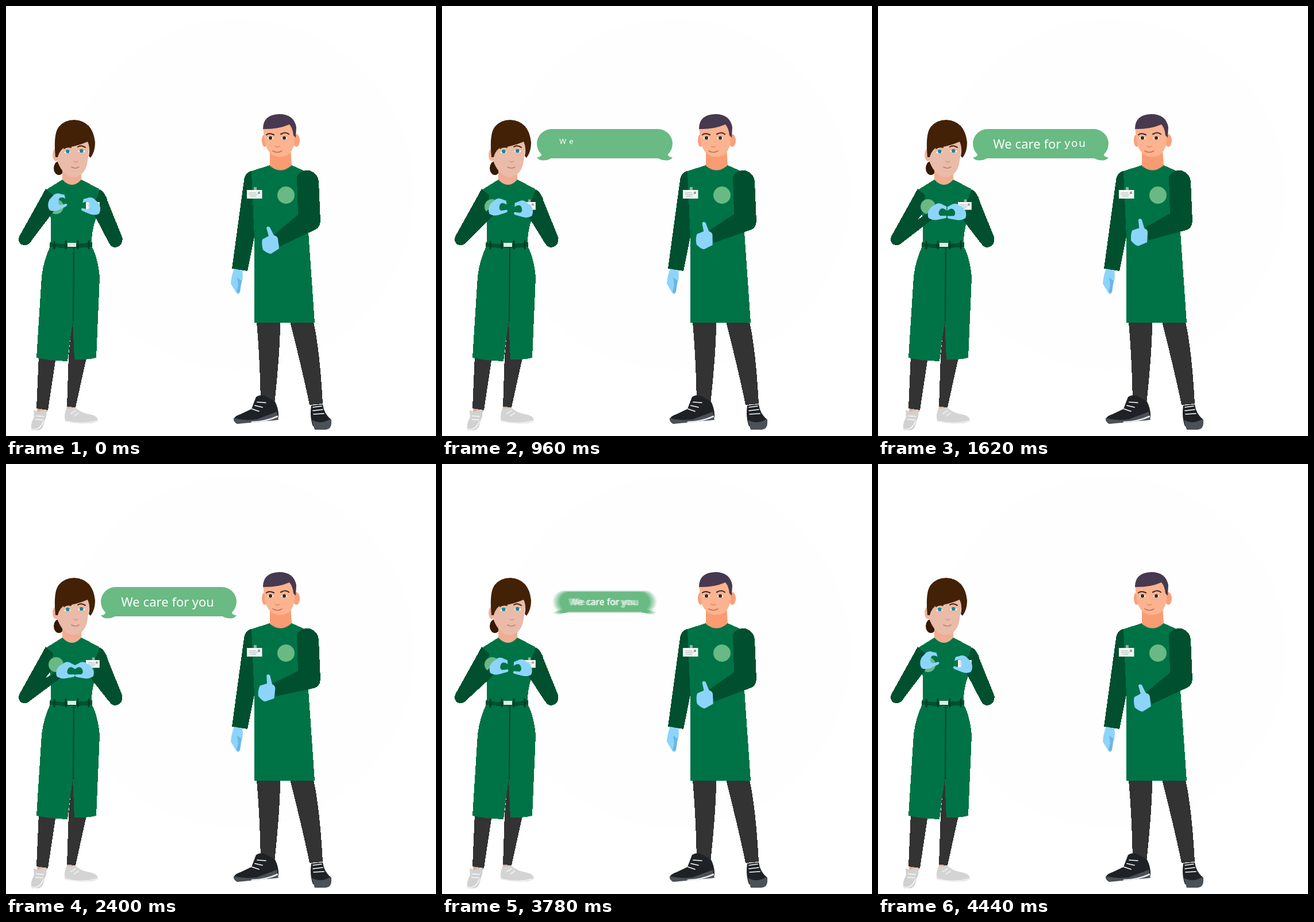
Recreate the animation shown at these times as an HTML page. Size 748 by 748 pixels, loop 4500 ms.

```html
<!DOCTYPE html>
<html lang="en">
<head>
<meta charset="utf-8">
<title>We care for you</title>
<style>
  html, body { margin: 0; width: 100%; height: 100%; overflow: hidden; background: #fff; }
  svg { display: block; width: 100%; height: 100%; }
  .coat, .sleeve, .pants { shape-rendering: crispEdges; }
  .coat { fill: #007346; }
  .sleeve { fill: #00502f; }
  .glove { fill: #8dd4fb; }
  .gloveDark { fill: #6cb5e8; }
  .pants { fill: #333; }
  .mark { fill: #6ab985; }
  .line { fill: none; stroke-linecap: round; stroke-linejoin: round; }
  text { font: 22px "Noto Sans", "Open Sans", sans-serif; fill: #fff; text-anchor: middle; }
</style>
</head>
<body>
<svg viewBox="0 0 748 748">
  <defs>
    <path id="tail" d="M165 263Q173 264 174 255L191 264Q184 269 174 268.5Q168 268 165 263Z"/>
    <g id="bubble" fill="#69ba83">
      <rect x="165" y="214" width="236" height="51" rx="25.5"/>
      <use href="#tail"/>
      <use href="#tail" transform="translate(566 0) scale(-1 1)"/>
    </g>
    <g id="words"></g>
    <path id="hand" class="glove" d="M88 369Q85 359 93 351L103 345Q109 343 114 347L120 350V357Q112 350 108 356Q104 363 109 366L119 366Q122 370 115 371L103 373Q94 374 88 369Z"/>
    <g id="badge">
      <path fill="#8fb3a2" d="M12 -5h5v6h-5z"/>
      <path fill="#f4f6f5" d="M0 0h26.500v15H0z"/>
      <path class="line" stroke="#a9b5af" d="M4 5h12M4 8h14M6 11h10"/>
      <path fill="#95a59d" d="M19 3h4v4h-4z"/>
    </g>
  </defs>

  <circle cx="404" cy="327" r="306" fill="#fefefe"/>

  <g id="woman">
    <path fill="#e6ad94" d="M54 696h18v10H54zM106 694h15v8h-15z"/>
    <path fill="#d1d1d1" d="M48 703L56 706L69 701Q73 711 67 721Q65 737 56 738L45 738Q41 729 49 715Z"/>
    <path fill="#d4d4d4" d="M105 700L121 699Q130 708 149 711Q162 715 159 723Q140 730 103 723Q100 712 105 700Z"/>
    <path class="line" stroke="#f1f1f1" stroke-width="2" d="M103 722Q130 729 158 722M46 736Q58 739 65 723M121 704l-8 5M126 708l-7 5M53 713l12 1M52 719l12 1"/>
    <path class="pants" d="M57 608L87 610L73 703L53 700ZM116 540L140 612L121 698L106 697L109 608Z"/>
    <path class="coat" d="M98 302Q115 319 131 302L162 318L166 350L157 368Q148 393 149 418Q160 438 163 472L157 612Q139 616 119 615L116 547L107 618Q78 617 53 612L62 470Q66 440 77 418Q79 394 78 370L66 322Z"/>
    <path class="line" stroke="#00502f" stroke-width="2.5" d="M118 422L117 548"/>
    <path class="sleeve" d="M76 412Q113 417 150 411V419Q113 423 76 419Z"/>
    <path class="line" stroke="#003d24" stroke-width="3" d="M84 410v12M104 409v13M125 409v13M144 409v13"/>
    <path fill="#e0ebe5" d="M107 412h15v7h-15z"/>

    <ellipse cx="92" cy="282" rx="9" ry="12" fill="#341904"/>
    <ellipse cx="87" cy="259" rx="6" ry="11" fill="#efb49c"/>
    <path fill="#f0ad91" d="M98 282H131V302Q115 320 98 302Z"/>
    <path fill="#e9bba8" d="M90 250V272Q100 296 117 298Q136 296 141 275L147 236Q115 224 90 250Z"/>
    <path fill="#432106" d="M86 263Q82 222 92 210Q102 198 119 198Q151 200 155 237Q155 254 147 264L144 261Q147 246 142 236Q121 245 100 247Q92 253 90 263Z"/>
    <path class="line" stroke="#432106" stroke-width="2" d="M101 248Q106 244 113 246M125 245Q131 241 138 246"/>
    <path fill="#fff" d="M101 255Q107 248 113 254Q107 258 101 255ZM125 253Q131 247 138 253Q131 257 125 253Z"/>
    <g fill="#188899">
      <circle cx="107.300" cy="253" r="3.300"/>
      <circle cx="131.300" cy="252" r="3.300"/>
    </g>
    <path class="line" stroke="#cf947f" stroke-width="1.300" d="M118 270Q121 273 125 270"/>
    <path class="line" stroke="#bd7c78" stroke-width="1.600" d="M114 280Q121 284 127 280"/>

    <path class="sleeve" d="M69 318L82 329L79 358L42 412Q35 418 27 415Q20 410 23 401ZM163 319Q173 324 177 340L202 402Q204 419 189 420Q182 419 178 410L155 366L153 345Z"/>
    <circle class="mark" cx="87" cy="349" r="13"/>
    <use href="#badge" transform="translate(139 341) scale(.9)"/>
    <g id="leftArm">
      <path class="sleeve" d="M24 400L89 360L94 373L39 414Q30 417 25 411Z"/>
      <use href="#hand"/>
    </g>
    <g id="rightArm">
      <path class="sleeve" d="M151 359L202 402Q203 416 191 419Q184 419 179 413L146 371Z"/>
      <use href="#hand" transform="translate(240 0) scale(-1 1)"/>
    </g>
  </g>

  <g id="man">
    <path class="pants" d="M436 549H477Q477 600 467 692L443 690Q442 620 436 549ZM494 549H535Q546 600 551 692L528 694Q517 640 494 549Z"/>
    <path fill="#1e2226" d="M435 680Q444 674 454 680L468 688Q475 702 474 716L440 724L396 719Q398 713 408 710L427 701ZM531 695L551 693Q553 709 566 720L565 731H534Q528 716 531 695Z"/>
    <path fill="#4a5157" d="M396 717Q415 722 436 719L471 706L474 720L402 727Q395 723 396 717ZM532 720Q548 729 565 718Q569 736 556 737H537Z"/>
    <path class="line" stroke="#e8eaec" stroke-width="3" d="M428 724Q452 723 472 714"/>
    <path class="line" stroke="#fff" stroke-width="1.700" d="M437 689l15 1M433 695l13 3M428 701l12 4M534 698l15-2M534 704l17-2M535 710l18-1"/>
    <path class="coat" d="M427 287L459 277Q478 292 497 277L524 289L530 380L526 393L537 551H432V400L424 340Z"/>
    <path class="sleeve" d="M427 287Q416 289 414 303L393 457L420 461L432 402Z"/>
    <path class="glove" d="M397 457L411 460Q414 475 408 484L407 497Q404 504 400 498L391 483Q392 469 397 457Z"/>
    <path class="gloveDark" d="M402 472L410 478L407 497Q404 503 401 497L404 486Z"/>

    <ellipse cx="450" cy="234" rx="5" ry="11" fill="#f6a17c"/>
    <ellipse cx="505" cy="234" rx="6" ry="11" fill="#f6a17c"/>
    <path fill="#f99b73" d="M459 248H495L497 277Q478 294 459 278Z"/>
    <path fill="#fcb38f" d="M447 211L501 203L502 234Q501 250 491 259Q477 266 463 259Q452 250 450 235Z"/>
    <path fill="#47394f" d="M447 214Q447 189 475 188Q501 188 505 211L504 229L500 225Q499 213 493 206Q472 215 447 214Z"/>
    <path class="line" stroke="#3b2c36" stroke-width="2.200" d="M453 224Q458 220 466 224M478 223Q486 218 492 223"/>
    <path fill="#fff" d="M454 230Q460 224 466 230Q460 234 454 230ZM478 230Q484 224 490 230Q484 234 478 230Z"/>
    <g fill="#302a2c">
      <circle cx="460" cy="229.500" r="3"/>
      <circle cx="484" cy="229.500" r="3"/>
    </g>
    <path class="line" stroke="#dc8964" stroke-width="1.400" d="M468 244Q472 247 476 244"/>
    <path class="line" stroke="#bf705c" stroke-width="1.600" d="M464 252Q472 257 480 252"/>

    <circle class="mark" cx="487" cy="329" r="15"/>
    <use href="#badge" transform="translate(419 320)"/>
    <path class="sleeve" d="M506 298Q511 285 527 286Q542 290 544 305L547 375Q546 386 535 390L516 384L508 362Z"/>
    <g id="thumbArm">
      <path class="sleeve" d="M467 397L513 359L540 362Q553 381 538 389L477 418Z"/>
      <path class="glove" d="M453 386Q455 382 459 385L466 399Q472 400 473 405L475 422L461 431Q455 431 447 424Q444 413 446 406L457 400Z"/>
    </g>
  </g>

  <g id="speech"></g>
</svg>
<script>
  const LOOP = 4500, SAMPLES = 8, SHUTTER = 15;
  const NS = "http://www.w3.org/2000/svg";
  const byId = id => document.getElementById(id);
  const set = (el, attrs) => {
    for (const key in attrs) el.setAttribute(key, attrs[key]);
  };
  const add = (parent, tag, attrs) => {
    const el = document.createElementNS(NS, tag);
    set(el, attrs);
    return parent.appendChild(el);
  };
  const ramp = (t, start, end) => Math.min(1, Math.max(0, (t - start) / (end - start)));
  const easeInOut = u => (1 - Math.cos(Math.PI * u)) / 2;
  const easeOutBack = u => 1 + 2.7 * (u - 1) ** 3 + 1.7 * (u - 1) ** 2;

  const words = [["We", 216.4], ["care", 260.6], ["for", 303.4], ["you", 342.8]].map(([label, center], i) => {
    const el = add(byId("words"), "text", {});
    el.textContent = label;
    return { el, center, start: 810 + 180 * i };
  });
  const copies = href => Array.from({ length: SAMPLES }, () => add(byId("speech"), "use", { href }));
  const bubbles = copies("#bubble"), captions = copies("#words");

  const bubbleScale = t => easeOutBack(t < 2000 ? ramp(t, 515, 815) : 1 - ramp(t, 3549, 3849));

  function drawWords(t) {
    for (const { el, center, start } of words) {
      const scale = 1 - (1 - ramp(t, start, start + 430)) ** 2;
      const spacing = 13 * (1 - scale);
      set(el, { x: center + spacing / 2, y: 229 + 18.5 * scale, visibility: scale ? "visible" : "hidden" });
      el.style.fontSize = 22 * scale + "px";
      el.style.letterSpacing = spacing + "px";
    }
  }

  // Nested copies, largest first, average into a radial motion blur.
  function drawSpeech(t) {
    const scales = bubbles.map((_, i) => bubbleScale(t + SHUTTER * i / SAMPLES)).sort((a, b) => b - a);
    const still = scales[0] - scales[SAMPLES - 1] < 0.002;
    scales.forEach((scale, i) => {
      const shown = scale > 0.001 && (!still || i === SAMPLES - 1);
      const display = shown ? "inline" : "none";
      const transform = `translate(283 240) scale(${scale}) translate(-283 -240)`;
      set(bubbles[i], { transform, display, opacity: 1 / (SAMPLES - i) });
      set(captions[i], { transform, display, opacity: still ? 1 : 2.2 / SAMPLES });
    });
  }

  function draw(now) {
    const t = now % LOOP;
    const open = t < 2500 ? 1 - easeInOut(ramp(t, 0, 1900)) : easeInOut(ramp(t, 3260, LOOP));
    const lift = 1 - Math.abs(1 - 2 * t / LOOP);
    set(byId("leftArm"), { transform: `rotate(${-16 * open} 33 405)` });
    set(byId("rightArm"), { transform: `rotate(${13 * open} 190 408)` });
    set(byId("thumbArm"), { transform: `rotate(${14.3 * lift} 532 378)` });
    drawWords(t);
    drawSpeech(t);
  }

  const begin = performance.now();
  const tick = () => {
    draw(performance.now() - begin);
    requestAnimationFrame(tick);
  };
  tick();
</script>
</body>
</html>
```
